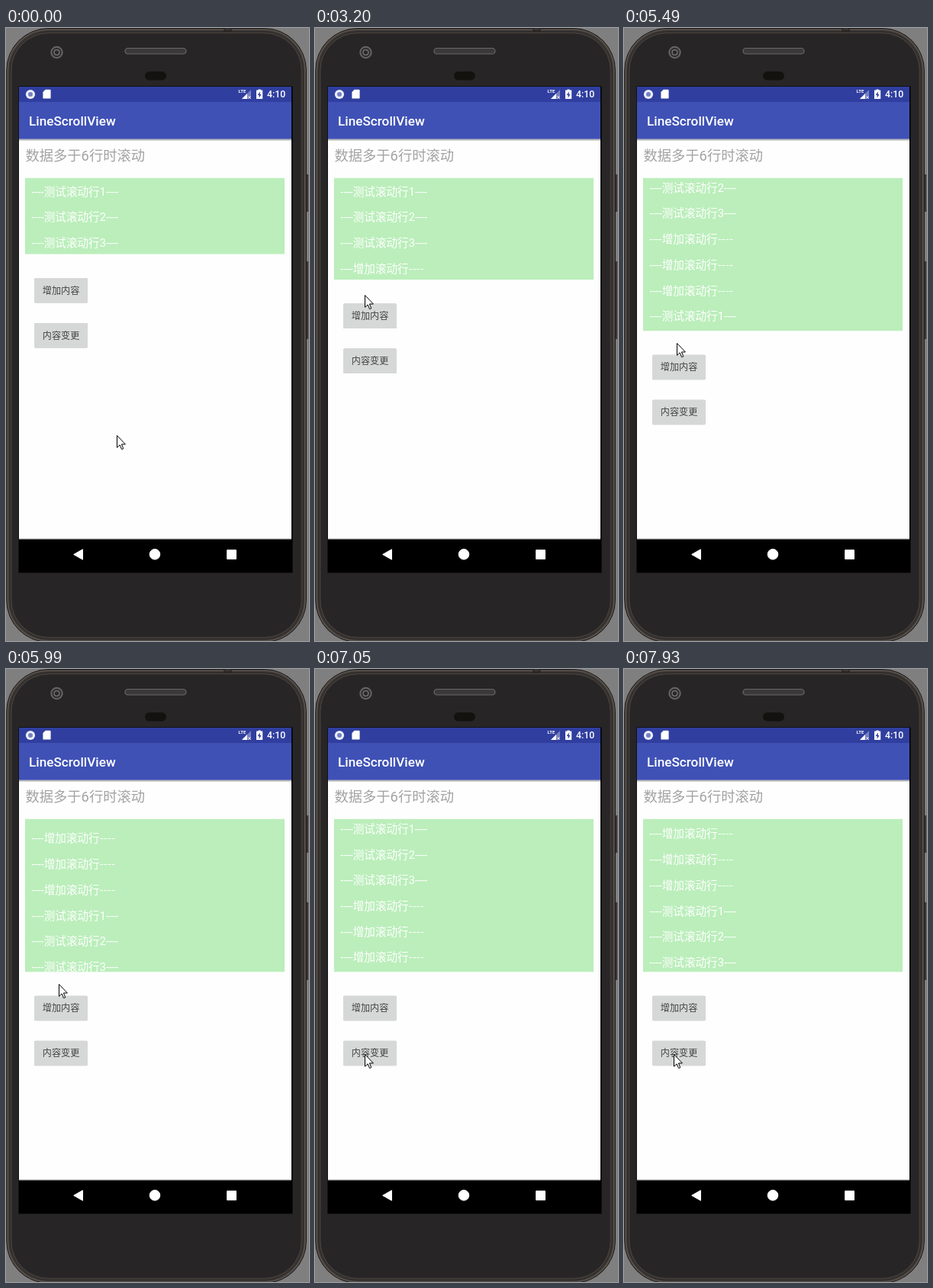
Write an HTML page that moves like this. It is 397 by 804 pixels and loops after 7.99 s.

```html
<!DOCTYPE html>
<html lang="zh-CN">
<head>
<meta charset="utf-8">
<title>LineScrollView</title>
<style>
  html, body { margin: 0; width: 100%; height: 100%; overflow: hidden; background: #7f7f7f; }
  svg { display: block; }
  text { font-family: Roboto, "Noto Sans CJK SC", "Noto Sans CJK", sans-serif; white-space: pre; }
  .cjk { font-family: "Noto Sans CJK SC", "Noto Sans CJK", sans-serif; }
  #rows text { font-size: 14.6px; fill: #fff; }
  .button rect { fill: #d6d7d7; filter: drop-shadow(0 .6px .5px #0004); }
  .button.pressed rect { filter: drop-shadow(0 2px 2.4px #0006); }
  .button text { font-size: 12.15px; fill: #444; }
</style>
</head>
<body>
<svg width="100%" height="100%" viewBox="0 0 397 804">
  <defs>
    <linearGradient id="shade" x2="0" y2="1">
      <stop stop-color="#000" stop-opacity=".4"/>
      <stop offset="1" stop-color="#000" stop-opacity="0"/>
    </linearGradient>
  </defs>

  <!-- phone body -->
  <rect width="397" height="804" fill="#7f7f7f"/>
  <g fill="#3a3633">
    <rect x="393" y="192" width="3.2" height="49"/>
    <rect x="393" y="306" width="3.2" height="102"/>
  </g>
  <g fill="none">
    <rect x=".8" y=".5" width="392.6" height="805" rx="55" fill="#3d3936" stroke="#1d1a19"/>
    <rect x="2.4" y="2.1" width="389.4" height="801.8" rx="53.5" stroke="#5e5650" stroke-width="1.4"/>
    <rect x="5" y="4.7" width="384.2" height="796.6" rx="51" stroke="#2b2826"/>
    <rect x="7" y="6.7" width="380.2" height="792.6" rx="49" fill="#272526" stroke="#47413d"/>
    <rect x="286" y="0" width="9" height="4" fill="#3a3532" stroke="#191716" stroke-width=".8"/>
    <rect x="156" y="26.5" width="80" height="7.5" rx="3.7" fill="#3b3a3a" stroke="#6a6767" stroke-width="1.2"/>
    <rect x="182" y="57" width="28" height="11.5" rx="5.7" fill="#14120e"/>
    <circle cx="66.5" cy="32" r="7.2" fill="#302e2f" stroke="#666465" stroke-width="2"/>
    <circle cx="66.5" cy="32" r="3.4" fill="#2a2829" stroke="#7a7879" stroke-width="1.3"/>
  </g>

  <!-- screen -->
  <rect x="16.5" y="76.5" width="359" height="638" fill="#000"/>
  <rect x="17" y="145" width="357" height="525" fill="#fefefe"/>
  <rect x="17" y="145.6" width="357" height="3" fill="url(#shade)"/>
  <rect x="17" y="77" width="357" height="20.5" fill="#303f9f"/>
  <rect x="17" y="97" width="357" height="48.6" fill="#3f51b5"/>
  <rect x="17" y="669" width="357" height="1" fill="#ddd"/>
  <rect x="17" y="670" width="357" height="1" fill="#777"/>

  <!-- status bar -->
  <circle cx="32" cy="87" r="6.1" fill="#eceefa"/>
  <circle cx="32" cy="87" r="3" fill="#7481c2"/>
  <g fill="#fff">
    <path d="M51.6 80.8H57.4Q58.6 80.8 58.6 82V91.4Q58.6 92.6 57.4 92.6H49.6Q48.4 92.6 48.4 91.4V84Z"/>
    <text x="304.6" y="85.4" font-size="6" font-weight="700">LTE</text>
    <path d="M321 81V93H309Z" opacity=".35"/>
    <path d="M316 86V93H309Z"/>
    <path d="M317.5 89.5L320.5 92.5M320.5 89.5L317.5 92.5" stroke="#fff" stroke-width=".9"/>
    <path d="M330.5 80.4H333.7V81.6H336.2V93H328V81.6H330.5Z"/>
    <text x="342" y="91.3" font-size="12.3" font-weight="500">4:10</text>
    <text x="30" y="128.2" font-size="17.2" font-weight="500">LineScrollView</text>
  </g>
  <path d="M332.7 83.3L329.8 88.1H331.6V91.8L334.5 87H332.7Z" fill="#303f9f"/>

  <text x="25.5" y="174.2" font-size="18.3" fill="#a3a3a3">数据多于6行时滚动</text>

  <svg id="list" x="25" y="196.5" width="340" height="100">
    <rect width="340" height="300" fill="#bbeebb"/>
    <g id="rows"></g>
  </svg>

  <g id="buttons">
    <g class="button" id="add">
      <rect x="37" y="328" width="70" height="32.5" rx="1.7"/>
      <text x="47.8" y="348.5">增加内容</text>
    </g>
    <g class="button">
      <rect x="37" y="387" width="70" height="32.5" rx="1.7"/>
      <text x="47.8" y="407.6">内容变更</text>
    </g>
  </g>

  <!-- navigation bar -->
  <g fill="#fff" stroke="#fff" stroke-linejoin="round">
    <path d="M88.7 690.5L100.5 683.8V697.2Z"/>
    <circle cx="195" cy="690.3" r="6.8"/>
    <rect x="289.7" y="684.7" width="11.8" height="11.8"/>
  </g>

  <path id="cursor" d="M.5 .5V16.3L4.1 12.9L6.6 18.6L8.8 17.7L6.4 12H11.4Z" fill="#fff" stroke="#000"/>
</svg>

<script>
  const LOOP = 7990;
  const ROW = 33.7, GROWTH = 33.6, CYCLE = 6 * ROW;
  const SCROLL_START = 5122, SCROLL_SPEED = 0.1073;
  const clicks = [2620, 4000, 5020];
  const HOLD = 115, ADD_DELAY = 50;

  // Bursts of screen updates: start, end, number of updates.
  const bursts = [
    [810, 1080, 3], [1180, 1940, 12], [2620, 2800, 3], [3200, 3380, 3], [3570, 3810, 4],
    [4000, 4480, 7], [5020, 5820, 14], [5820, 6630, 14], [6630, 7460, 14], [7460, 7990, 9]
  ];
  const updates = bursts.flatMap(([start, end, count]) =>
    Array.from({ length: count }, (_, k) =>
      start + Math.round((end - start) * k / count / 10) * 10));

  // Pointer path: time, x, y.
  const path = [
    [720, 145, 534], [990, 138, 529], [1120, 138, 529], [1350, 120, 480], [1600, 75, 380],
    [1740, 59, 342], [1880, 62, 346], [3140, 62, 346], [3320, 72, 360], [3510, 72, 360],
    [3750, 69, 375], [4150, 69, 375], [4410, 69, 413], [6370, 69, 413], [6630, 69, 494],
    [6800, 65, 505]
  ];

  const byId = id => document.getElementById(id);
  const list = byId('list'), rows = byId('rows'), buttons = byId('buttons');
  const add = byId('add'), cursor = byId('cursor');

  const label = i => i < 3
    ? `----测试滚动行${i + 1}----`
    : '----增加滚动行<tspan class="cjk">----</tspan>';
  rows.innerHTML = Array.from({ length: 13 }, (_, i) =>
    `<text x="8.6" y="${23 + i * ROW}">${label(i % 6)}</text>`).join('');

  const move = (el, x, y) => el.setAttribute('transform', `translate(${x} ${y})`);

  // The pointer always sits on whole pixels.
  function pointerAt(t) {
    const next = path.findIndex(key => key[0] > t);
    if (next < 0) return path[path.length - 1].slice(1);
    if (next === 0) return path[0].slice(1);
    const [t0, x0, y0] = path[next - 1], [t1, x1, y1] = path[next];
    const u = (t - t0) / (t1 - t0);
    return [x0 + (x1 - x0) * u, y0 + (y1 - y0) * u].map(Math.floor);
  }

  function draw() {
    const now = performance.now() % LOOP;
    const t = updates.filter(u => u <= now).pop() ?? 0;
    const added = clicks.filter(c => t >= c + ADD_DELAY).length;
    const scroll = Math.max(0, t - SCROLL_START) * SCROLL_SPEED % CYCLE;

    list.setAttribute('height', 100 + added * GROWTH);
    move(rows, 0, -scroll);
    move(buttons, 0, added * GROWTH);
    add.classList.toggle('pressed', clicks.some(c => t >= c && t < c + HOLD));
    move(cursor, ...pointerAt(t));
    requestAnimationFrame(draw);
  }
  draw();
</script>
</body>
</html>
```
